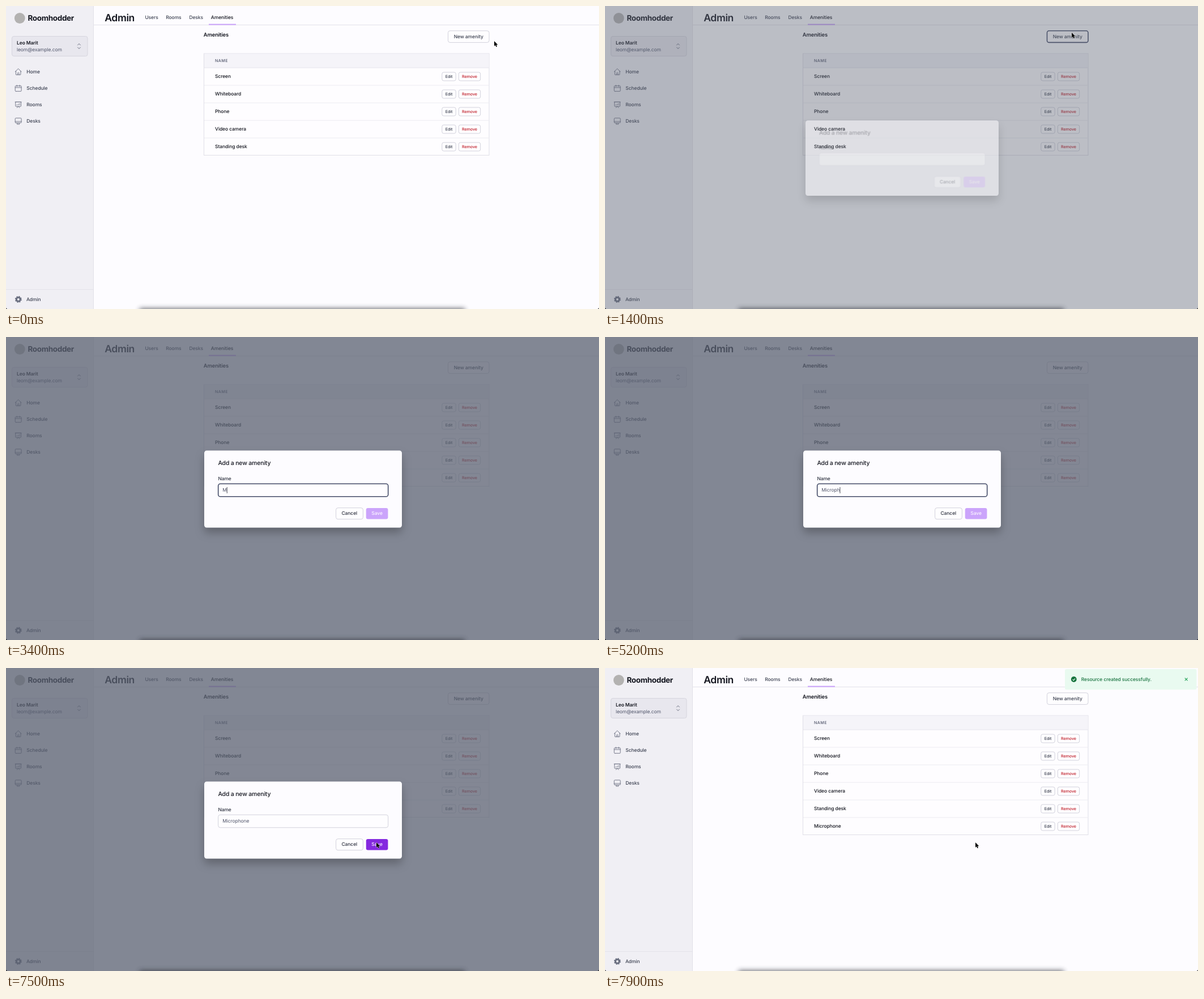
Recreate the animation shown at these times as an HTML page. Size 1047x535 px, loop 8000 ms.

```html
<!DOCTYPE html>
<html lang="en">
<head>
<meta charset="utf-8">
<title>Amenities admin</title>
<style>
  html, body { margin: 0; width: 100%; height: 100%; overflow: hidden; background: #fdfcff; }
  svg { display: block; width: 100vw; height: 100vh; }
  text { font: 500 8.48px Inter, sans-serif; letter-spacing: -.01em; fill: #14161f; text-rendering: geometricPrecision; white-space: pre; }
  .mid { text-anchor: middle; }
  .bold { font-weight: 600; }
  .soft { fill: #50556a; }
  .nav text, .tab { fill: #3d4252; }
  .small text { font-size: 7.15px; fill: #3a3f4e; }
  .small .danger { fill: #c0202b; }
  .box { fill: #fefdff; stroke: #d2d2dc; }
  .line { fill: none; stroke: #e3e2e9; }
  .icon { fill: none; stroke: #6a6f80; stroke-width: 1.5; stroke-linecap: round; stroke-linejoin: round; }
  .focus { stroke: #444c68; stroke-width: 1.6; }
</style>
</head>
<body>
<svg viewBox="0 0 1047 535">
  <defs>
    <filter id="blur" x="-10%" y="-200%" width="120%" height="500%"><feGaussianBlur stdDeviation="4"/></filter>
    <filter id="shadow" x="-20%" y="-30%" width="140%" height="180%">
      <feDropShadow dx="0" dy="9" stdDeviation="8" flood-color="#000" flood-opacity=".26"/>
    </filter>
  </defs>
  <rect width="1047" height="535" fill="#fdfcff"/>

  <g id="sidebar">
    <rect width="155" height="535" fill="#f0eff4"/>
    <path class="line" d="M154.5 0V535M0 500.5H154"/>
    <circle cx="24.3" cy="21.5" r="9.4" fill="#b3b2b1"/>
    <text x="38.5" y="26.4" style="font-size:13.5px;font-weight:700;letter-spacing:-.025em">Roomhodder</text>
    <rect x="10.5" y="53.5" width="133.5" height="35" rx="3.5" fill="#e8e7ee" stroke="#d6d5de"/>
    <text x="19" y="68" class="bold">Leo Marit</text>
    <text x="19" y="80" class="soft" style="font-weight:400">leom@example.com</text>
    <path class="icon" style="stroke-width:1" d="M126.6 69l2.4-2.5 2.4 2.5M126.6 73l2.4 2.5 2.4-2.5"/>
    <g class="nav" id="nav"></g>
    <g fill="none" stroke="#6a6f80" transform="translate(21.8 518)">
      <circle r="3.4" stroke-width="2.9"/>
      <circle r="5.2" stroke-width="1.6" stroke-dasharray="2.3 1.784"/>
    </g>
    <g class="nav"><text x="36" y="521.1">Admin</text></g>
  </g>

  <g id="header">
    <path class="line" d="M155 33.5H1047"/>
    <text x="174.2" y="26.6" class="bold" style="font-size:17.6px;letter-spacing:-.022em">Admin</text>
    <text x="245.4" y="23.1" class="tab">Users</text>
    <text x="282.3" y="23.1" class="tab">Rooms</text>
    <text x="323.4" y="23.1" class="tab">Desks</text>
    <text x="361.8" y="23.1">Amenities</text>
    <rect x="358" y="31.6" width="48" height="2" fill="#cba4fb"/>
  </g>

  <text x="348.8" y="54.3" class="bold" style="font-size:9.4px;letter-spacing:-.015em">Amenities</text>
  <rect id="newButton" class="box" x="780.5" y="43.8" width="72.5" height="20.6" rx="3.5"/>
  <text x="816.7" y="57.2" class="mid" style="fill:#3a3f4e">New amenity</text>

  <rect id="tableFrame" x="349.5" y="84" width="503.5" fill="#fefdff" stroke="#e0dfe7"/>
  <rect x="350" y="84.5" width="502.5" height="24" fill="#f5f4f9"/>
  <path class="line" d="M350 109H852.5"/>
  <text x="369" y="99.4" class="soft" style="font-size:7.1px;letter-spacing:.06em">NAME</text>
  <g id="rows"></g>

  <rect id="overlay" width="1047" height="535" fill="#5a6070"/>

  <g id="modal">
    <rect id="card" x="350" y="200.5" width="349" height="136" rx="4.5" fill="#fdfcff" filter="url(#shadow)"/>
    <g id="form">
      <text x="374.4" y="226.4" style="font-size:10.5px;font-weight:550;letter-spacing:-.017em">Add a new amenity</text>
      <text x="374.4" y="253.3" style="fill:#2f3340">Name</text>
      <rect id="input" class="box" x="374.7" y="259.2" width="300" height="22.6" rx="3.6"/>
      <text id="typed" x="382.3" y="273.3" class="soft" style="font-weight:400"></text>
      <path id="caret" d="M.4 265V276" stroke="#22252f" stroke-width=".8"/>
      <rect class="box" x="582.6" y="301.7" width="47.8" height="20" rx="3.5"/>
      <text x="606.3" y="314.4" class="mid" style="fill:#2f3340">Cancel</text>
      <rect id="save" x="635.8" y="302" width="38.6" height="19.4" rx="3.2"/>
      <text x="655.1" y="314.4" class="mid" style="fill:#fbf6ff">Save</text>
    </g>
  </g>
  <g id="ghost">
    <text x="369" y="220.3">Video camera</text>
    <text x="369" y="251.3">Standing desk</text>
  </g>

  <g id="flash">
    <rect x="812" y="2" width="232.5" height="36.3" rx="3" fill="#e9faf0"/>
    <circle cx="827.8" cy="20" r="4.9" fill="#16743d"/>
    <path d="M825.6 20.2l1.6 1.6 2.9-3.2" fill="none" stroke="#e9faf0" stroke-width="1.2"/>
    <text x="840.8" y="23.1" style="fill:#1a7440">Resource created successfully.</text>
    <path d="M1023.8 17.6l4.8 4.8m0-4.8l-4.8 4.8" stroke="#27a35a" stroke-width="1.2"/>
  </g>

  <rect x="236" y="534" width="574" height="12" fill="#33343c" opacity=".75" filter="url(#blur)"/>
  <path d="M0 532Q0 535 3 535H0ZM1047 532Q1047 535 1044 535H1047Z"/>
  <path id="cursor" d="M0 0V8.9L2 7.1L3.4 10.3L5 9.6L3.6 6.5H6.4Z" stroke="#fff" stroke-width=".8" paint-order="stroke"/>
</svg>

<script>
const $ = id => document.getElementById(id);
const LOOP = 8000, STEP = 100;

const navItems = {
  Home: 'M3 12l2-2m0 0l7-7 7 7M5 10v10a1 1 0 001 1h3m10-11l2 2m-2-2v10a1 1 0 01-1 1h-3m-6 0a1 1 0 001-1v-4a1 1 0 011-1h2a1 1 0 011 1v4a1 1 0 001 1m-6 0h6',
  Schedule: 'M8 7V3m8 4V3m-13 7h18M5 21h14a2 2 0 002-2V7a2 2 0 00-2-2H5a2 2 0 00-2 2v12a2 2 0 002 2z',
  Rooms: 'M8 13v-1m4 1v-3m4 3V8M8 21l4-4 4 4M3 4h18M4 4h16v12a1 1 0 01-1 1H5a1 1 0 01-1-1V4z',
  Desks: 'M9.75 17L9 20l-1 1h8l-1-1-.75-3M3 13h18M5 17h14a2 2 0 002-2V5a2 2 0 00-2-2H5a2 2 0 00-2 2v10a2 2 0 002 2z'
};
$('nav').innerHTML = Object.entries(navItems).map(([label, d], i) => `
  <path class="icon" transform="translate(14.4 ${108.8 + 29.1 * i}) scale(.606)" d="${d}"/>
  <text x="36.3" y="${119 + 29.1 * i}">${label}</text>`).join('');

const amenities = ['Screen', 'Whiteboard', 'Phone', 'Video camera', 'Standing desk', 'Microphone'];
$('rows').innerHTML = amenities.map((name, i) => `
  <g transform="translate(0 ${109 + 31 * i})">
    ${i ? '<path class="line" style="stroke:#ecebf1" d="M350 0H852.5"/>' : ''}
    <text x="369" y="18.3">${name}</text>
    <g class="small">
      <rect class="box" x="769.8" y="8" width="24.4" height="15" rx="3"/>
      <text class="mid" x="782" y="18.1">Edit</text>
      <rect class="box" x="799.3" y="8" width="38.4" height="15" rx="3"/>
      <text class="mid danger" x="818.5" y="18.1">Remove</text>
    </g>
  </g>`).join('');
const newRow = $('rows').lastElementChild;

const CLICK_NEW = 1250, FOCUS = 2400, CLICK_SAVE = 7200, ROW_ADDED = 7600;
const keyTimes = [3400, 3600, 3900, 4300, 4400, 5000, 5200, 5400, 5700, 5800];
const cursorPath = [
  [100, 862, 62], [1000, 824, 47], [1850, 824, 47], [2500, 531, 304], [6000, 531, 304], [6800, 654, 308]
];

const progress = (t, start, length) => Math.min(1, Math.max(0, (t - start) / length));
const smooth = x => x * x * (3 - 2 * x);

// Cubic Bézier easing, solved for x by bisection.
function bezier(x1, y1, x2, y2, x) {
  const at = (a, b, s) => 3 * (1 - s) ** 2 * s * a + 3 * (1 - s) * s * s * b + s ** 3;
  let low = 0, high = 1;
  for (let i = 0; i < 24; i++) {
    const s = (low + high) / 2;
    if (at(x1, x2, s) < x) low = s; else high = s;
  }
  return at(y1, y2, low);
}

function cursorAt(t) {
  let [, x, y] = cursorPath[0];
  for (let i = 1; i < cursorPath.length; i++) {
    const [start] = cursorPath[i - 1], [end, nextX, nextY] = cursorPath[i];
    const k = smooth(progress(t, start, end - start));
    x += (nextX - x) * k;
    y += (nextY - y) * k;
  }
  return [x, y];
}

function draw(t) {
  const entering = bezier(0, 0, .2, 1, progress(t, 1333, 300));
  const leaving = bezier(.4, 0, 1, 1, progress(t, 7500, 200));
  const shown = t < 1333 || t >= 7700 ? 0 : entering * (1 - leaving);
  const scale = .95 + .05 * shown;
  $('overlay').setAttribute('opacity', .75 * shown);
  $('modal').setAttribute('transform', `translate(524.5 268.5) scale(${scale}) translate(-524.5 -268.5)`);
  $('card').setAttribute('opacity', shown);
  $('form').setAttribute('opacity', shown ** 2);
  $('ghost').setAttribute('opacity', shown ? 1 - shown ** 2 : 0);

  const focused = t >= FOCUS && t < CLICK_SAVE;
  $('newButton').classList.toggle('focus', t >= CLICK_NEW && t < FOCUS);
  $('input').classList.toggle('focus', focused);

  const count = keyTimes.filter(k => k <= t).length;
  $('typed').textContent = 'Microphone'.slice(0, count);
  const sinceKey = t - (count ? keyTimes[count - 1] : FOCUS);
  const caretX = 382.3 + (count ? $('typed').getComputedTextLength() : 0);
  $('caret').setAttribute('transform', `translate(${caretX} 0)`);
  $('caret').setAttribute('opacity', focused && sinceKey % 1000 < 500 ? 1 : 0);

  const [x, y] = cursorAt(t);
  $('cursor').setAttribute('transform', `translate(${x} ${y})`);
  $('cursor').setAttribute('opacity', t >= keyTimes[0] && t < 6000 ? 0 : 1);
  $('save').setAttribute('fill', t > 6000 && x > 636 ? '#8429df' : '#cba4fb');

  const added = t >= ROW_ADDED;
  newRow.setAttribute('opacity', added ? 1 : 0);
  $('tableFrame').setAttribute('height', added ? 210.5 : 179.5);
  $('flash').setAttribute('opacity', progress(t, 7700, 200));
}

const startTime = performance.now();
function tick() {
  const elapsed = (performance.now() - startTime) % LOOP;
  draw(Math.floor(elapsed / STEP) * STEP);
  requestAnimationFrame(tick);
}
tick();
</script>
</body>
</html>
```
